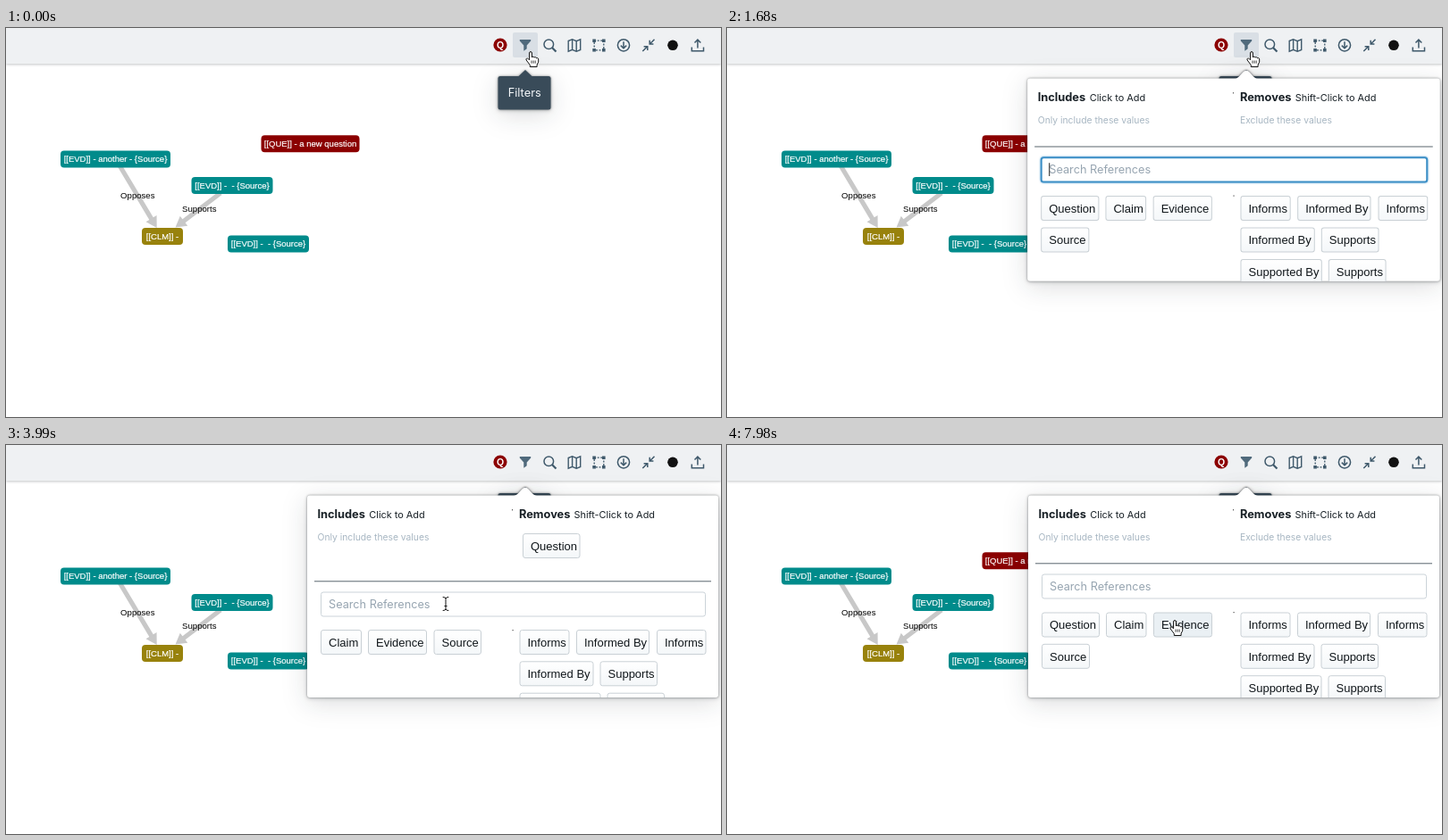
Recreate the animation shown at these times as an HTML page. Size 800x436 px, loop 8000 ms.

```html
<!DOCTYPE html>
<html lang="en">
<head>
<meta charset="utf-8">
<title>Graph filters</title>
<style>
  html, body { margin: 0; width: 100%; height: 100%; overflow: hidden; background: #fff; }
  svg { display: block; width: 800px; height: 436px; }
  text { font-family: "Liberation Sans", Arial, sans-serif; white-space: pre; }
  .ui { font-family: Inter, sans-serif; }
  .muted { fill: #a7b6c2; }
  .icon { fill: none; stroke: #3f596b; stroke-width: 1.5; }
  .solid { fill: #3f596b; stroke: none; }
  .raised { filter: drop-shadow(0 0 1px rgba(16,22,26,.4)) drop-shadow(0 1px 2px rgba(16,22,26,.22)) drop-shadow(0 6px 14px rgba(16,22,26,.14)); }
  .node { font-size: 9.5px; fill: #fff; stroke: #fff; stroke-width: .2; text-anchor: middle; }
  .edge { font-size: 9.6px; text-anchor: middle; }
  .tag rect { fill: url(#tagFill); stroke: #c9d0d5; }
  .tag.hover rect { fill: #eaf0f4; }
  .tag text { font-size: 13px; fill: #10161a; }
  #field { fill: #fff; stroke: #cbd3d9; }
  #field.focus { stroke: #3c8fc6; stroke-width: 2; filter: drop-shadow(0 0 1px #6fb0dc); }
</style>
</head>
<body>
<svg viewBox="0 0 800 436">
  <defs>
    <linearGradient id="tagFill" x2="0" y2="1">
      <stop stop-color="#fff"/><stop offset="1" stop-color="#f4f7f9"/>
    </linearGradient>
    <clipPath id="panelClip"><rect x="337" y="56.5" width="460" height="226.5" rx="3"/></clipPath>
  </defs>

  <g id="graph"></g>

  <rect y="-5" width="800" height="45" fill="#eff1f3" style="filter:drop-shadow(0 1px 1.5px rgba(16,22,26,.25))"/>
  <rect id="filterHover" x="567" y="5" width="28" height="28" rx="2" fill="#d9dfe5"/>
  <g class="icon">
    <circle cx="553" cy="19" r="7.6" fill="#8b0000" stroke="none"/>
    <text x="553" y="22.7" font-size="10.5" font-weight="700" fill="#fff" stroke="none" text-anchor="middle">Q</text>
    <path d="M574.8 13h12.4v1.6l-4.5 4.8v3.8l-3.4 2.6v-6.4l-4.5-4.8z" fill="#506a7c" stroke="none"/>
    <circle cx="607.3" cy="18.3" r="5.3"/><path d="M611 22l4.5 4.5" stroke-width="2.2"/>
    <path d="M629.2 14.5l4.4-1.8 4.6 2 4.5-1.8v11.6l-4.5 1.8-4.6-2-4.4 1.8zM633.6 12.7v11.6M638.2 14.7v11.6" stroke-width="1.4"/>
    <path d="M658.2 14.2h10.6v10.6h-10.6z" stroke-width="1.3" stroke-dasharray="2 1.5"/>
    <path class="solid" d="M656.3 12.5h3.6v3.6h-3.6zM667 12.5h3.6v3.6h-3.6zM656.3 23h3.6v3.6h-3.6zM667 23h3.6v3.6h-3.6z"/>
    <circle cx="691" cy="19.3" r="6.6"/><path d="M691 15.2v7M687.8 19.6l3.2 3.1 3.2-3.1"/>
    <path d="M725.5 12.7l-5 5M720.2 13.8v4.2h4.2M712.3 26l5-5M713.6 20.7h4.2v4.2"/>
    <circle cx="746" cy="19.3" r="5.8" fill="#111" stroke="none"/>
    <path d="M767.3 21.5v4.3h13.2v-4.3M773.9 22.5v-8.8M770.5 16.5l3.4-3.4 3.4 3.4"/>
  </g>

  <g class="raised">
    <path d="M573 54.5l8-7.5 8 7.5z" fill="#394b59"/>
    <rect x="550.5" y="54" width="59" height="37.5" rx="2.5" fill="#394b59"/>
  </g>
  <text class="ui" x="580.2" y="77.3" font-size="12.8" fill="#f5f8fa" text-anchor="middle">Filters</text>

  <g id="panel">
    <g class="raised">
      <path d="M568 57c5 0 9-9.5 13-9.5s8 9.5 13 9.5z" fill="#fff"/>
      <rect x="337" y="56.5" width="460" height="226.5" rx="3" fill="#fff"/>
    </g>
    <g clip-path="url(#panelClip)">
      <g fill="#182026">
        <text class="ui" x="348.5" y="82" font-size="12.8" font-weight="700">Includes</text>
        <text class="ui" x="406.3" y="82" font-size="10.9">Click to Add</text>
        <text class="ui" x="574" y="82" font-size="12.8" font-weight="700">Removes</text>
        <text class="ui" x="635.5" y="82" font-size="10.9">Shift-Click to Add</text>
      </g>
      <text class="ui muted" x="348.6" y="106.6" font-size="10.3">Only include these values</text>
      <text class="ui muted" id="excludeHint" x="574" y="106.6" font-size="10.3">Exclude these values</text>
      <rect x="566" y="72" width="1" height="1.4" fill="#555"/>
      <g id="lower">
        <path d="M345 132.8h444" stroke="#58646d"/>
        <rect id="field" x="352.5" y="145" width="430" height="27" rx="2.5"/>
        <text class="ui" x="361" y="163" font-size="12.7" fill="#97a5b1">Search References</text>
        <path id="caret" d="M361.5 151v14.5" stroke="#222"/>
        <rect x="566.5" y="187" width="1.2" height="1.2" fill="#555"/>
      </g>
      <g id="allTags"></g>
      <g id="filteredTags"></g>
    </g>
  </g>

  <g id="cursor" stroke-linejoin="round">
    <g id="hand" stroke="#111">
      <path fill="#fff" d="M-1.4 1q0-1.4 1.4-1.4t1.4 1.4v5q.3-.9 1.4-.8t1.3 1q.4-.8 1.4-.5t1 1.2q.4-.6 1.3-.3t.9 1.3v3.3l-1.6 3v2.3H-.7v-2L-4.8 9q-.8-1.3.3-1.8t2.1.6l1 1z"/>
      <path stroke-width=".8" d="M1 9.5v3.2M3.1 9.5v3.2M5.2 9.5v3.2"/>
    </g>
    <path id="arrow" fill="#000" stroke="#fff" stroke-width=".8" d="M0 0v12.8l2.9-2.7 1.9 4.6 2.1-.9-1.9-4.4h4z"/>
    <path id="beam" fill="none" stroke="#111" d="M-3.3-7.5q2.8 0 3.3 1.5.5-1.5 3.3-1.5M-3.3 7.5q2.8 0 3.3-1.5.5 1.5 3.3 1.5M0-6v12M-1.5 2.5h3"/>
  </g>
</svg>

<script>
const LOOP = 8000, STEP = 70;
const OPEN_AT = 1386, OPEN_MS = 300, REMOVE_AT = 3200, RESTORE_AT = 5600;
const SHIFT = 20;
const $ = id => document.getElementById(id);
const show = (id, on) => { $(id).style.display = on ? '' : 'none'; };

// Graph
const TEAL = '#008b8b';
const node = (id, x, y, w, fill, label) =>
  `<g id="${id}"><rect x="${x}" y="${y}" width="${w}" height="19" rx="4" fill="${fill}"/>
   <text class="node" x="${x + w / 2}" y="${y + 12.5}">${label}</text></g>`;

function edge(x1, y1, x2, y2, label, lx, ly) {
  const a = Math.atan2(y2 - y1, x2 - x1) * 180 / Math.PI, len = Math.hypot(x2 - x1, y2 - y1);
  return `<path transform="translate(${x1} ${y1}) rotate(${a})" fill="#c8c8c8"
    d="M0-2.6H${len - 12}V-7L${len} 0 ${len - 12} 7V2.6H0z"/>
    <text class="edge" x="${lx}" y="${ly}">${label}</text>`;
}

$('graph').innerHTML =
  edge(127, 154, 168.7, 224, 'Opposes', 147.3, 191) +
  edge(240, 185, 189.5, 223.5, 'Supports', 216.3, 206.3) +
  node('evidence1', 61, 137.5, 123, TEAL, '[[EVD]] - another - {Source}') +
  node('evidence2', 207.5, 167, 91, TEAL, '[[EVD]] -  - {Source}') +
  node('evidence3', 248, 232.5, 91, TEAL, '[[EVD]] -  - {Source}') +
  node('claim', 152, 224, 46, '#98820c', '[[CLM]] -') +
  node('question', 285.5, 120.3, 110, '#8b0000', '[[QUE]] - a new question');

// Tags: label, x, y, width
const relations = dy => [
  ['Informs', 575, 188, 55], ['Informed By', 638.5, 188, 81], ['Informs', 728.5, 188, 54.5],
  ['Informed By', 575, 223.3, 82], ['Supports', 665, 223.3, 63.5],
  ['Supported By', 575, 258.7, 90], ['Supports', 673, 258.7, 63.5]
].map(([label, x, y, w]) => [label, x, y + dy, w]);

const allTags = [
  ['Question', 352.5, 188, 64], ['Claim', 424.5, 188, 44.5], ['Evidence', 477.5, 188, 65],
  ['Source', 352.5, 223.3, 53], ...relations(0)
];
const filteredTags = [
  ['Question', 578.5, 99.5, 63.5], ['Claim', 352.5, 207.5, 45], ['Evidence', 405.5, 207.5, 65],
  ['Source', 479, 207.5, 52.5], ...relations(SHIFT - .5)
];
const drawTags = (id, tags) => {
  $(id).innerHTML = tags.map(([label, x, y, w]) =>
    `<g class="tag"><rect x="${x}" y="${y}" width="${w}" height="27" rx="2.5"/>
     <text x="${x + 8.5}" y="${y + 18.4}">${label}</text></g>`).join('');
};
drawTags('allTags', allTags);
drawTags('filteredTags', filteredTags);

// Motion
const path = [
  [0, 587, 27], [1750, 587, 27], [2450, 394, 213], [3350, 394, 213], [3900, 492, 178],
  [4250, 492, 178], [4850, 607, 114], [5750, 607, 114], [6250, 587, 117],
  [7350, 587, 117], [7930, 501, 197], [LOOP, 501, 197]
];

function pointer(t) {
  const i = path.findIndex(key => key[0] > t);
  const [t0, x0, y0] = path[i - 1], [t1, x1, y1] = path[i];
  const u = (t - t0) / (t1 - t0), e = u * u * (3 - 2 * u);
  return [x0 + (x1 - x0) * e, y0 + (y1 - y0) * e];
}

const bezier = (a, b, s) => 3 * (1 - s) ** 2 * s * a + 3 * (1 - s) * s * s * b + s ** 3;

function popScale(u) {
  if (u <= 0 || u >= 1) return u <= 0 ? 0 : 1;
  let lo = 0, hi = 1;
  for (let i = 0; i < 20; i++) {
    const mid = (lo + hi) / 2;
    if (bezier(.54, .38, mid) < u) lo = mid; else hi = mid;
  }
  return bezier(1.12, 1.11, lo);
}

const inside = (px, py, x, y, w, h) => px >= x && px <= x + w && py >= y && py <= y + h;

function render(t) {
  const [px, py] = pointer(t);
  const scale = popScale((t - OPEN_AT) / OPEN_MS);
  const filtered = t >= REMOVE_AT && t < RESTORE_AT;
  const focused = t < REMOVE_AT;
  const dy = filtered ? SHIFT : 0;

  show('panel', scale > 0);
  $('panel').setAttribute('transform', `translate(581 48) scale(${scale}) translate(-581 -48)`);
  $('lower').setAttribute('transform', `translate(0 ${dy})`);
  $('field').classList.toggle('focus', focused);
  show('caret', focused && (t - 1500) % 1000 < 500);
  show('excludeHint', !filtered);
  show('question', !filtered);
  show('allTags', !filtered);
  show('filteredTags', filtered);

  const onFilter = inside(px, py, 567, 5, 28, 28);
  show('filterHover', onFilter);
  const tags = filtered ? filteredTags : allTags;
  const hovered = scale === 1 ? tags.findIndex(([, x, y, w]) => inside(px, py, x, y, w, 27)) : -1;
  [...$(filtered ? 'filteredTags' : 'allTags').children]
    .forEach((tag, i) => tag.classList.toggle('hover', i === hovered));

  const kind = onFilter || hovered >= 0 ? 'hand'
    : inside(px, py, 352, 145 + dy, 431, 27) ? 'beam' : 'arrow';
  for (const id of ['hand', 'arrow', 'beam']) show(id, id === kind);
  $('cursor').setAttribute('transform', `translate(${px} ${py})`);
}

function frame() {
  const t = performance.now() % LOOP;
  render(Math.floor(t / STEP) * STEP);
  requestAnimationFrame(frame);
}
frame();
</script>
</body>
</html>
```
